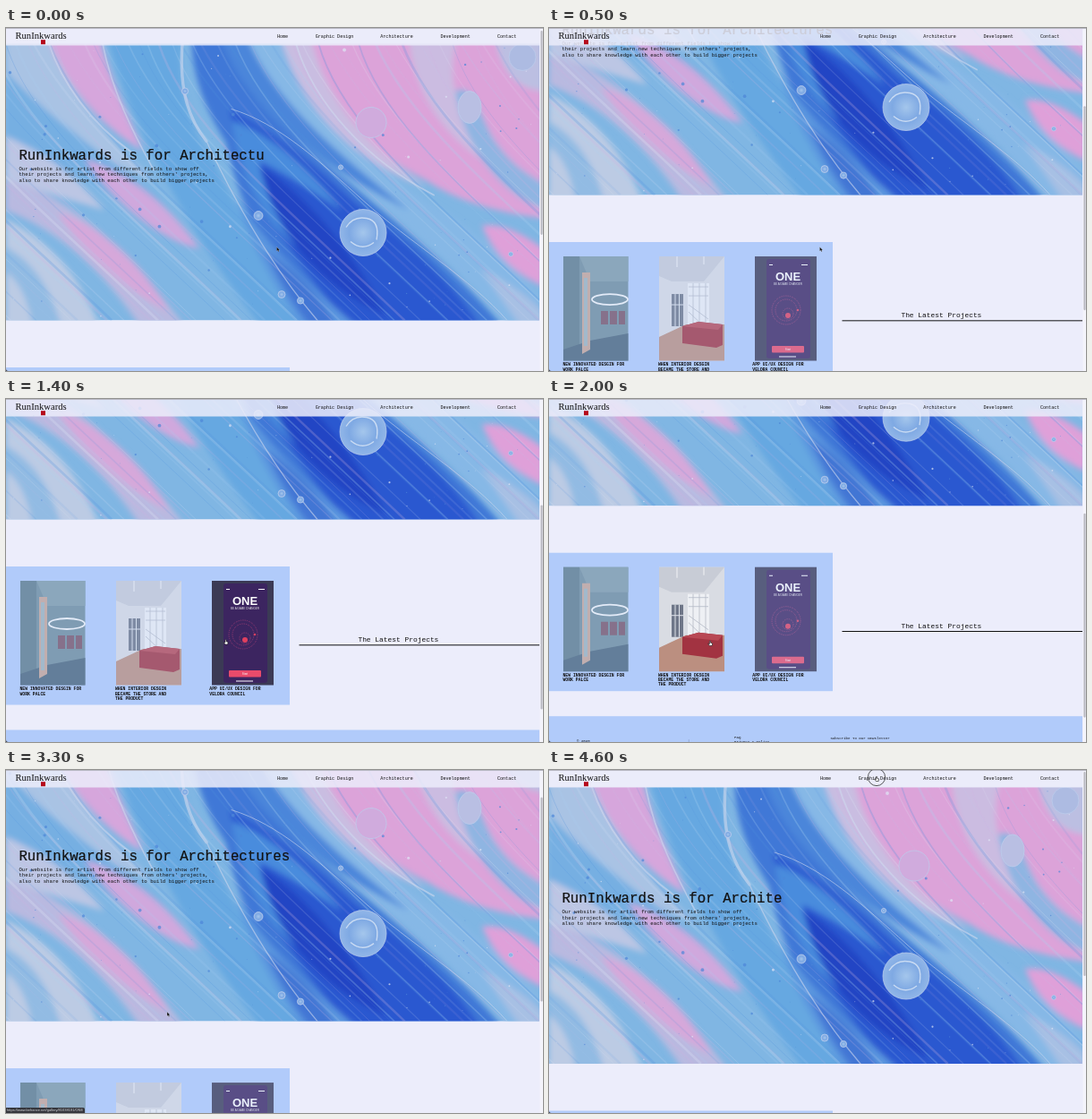
Recreate the animation shown at these times as an HTML page. Size 600x383 px, loop 4700 ms.

```html
<!DOCTYPE html>
<html lang="en">
<head>
<meta charset="utf-8">
<title>Portfolio page</title>
<style>
  html, body { margin: 0; width: 100%; height: 100%; overflow: hidden; background: #ecedfb; }
  svg { display: block; width: 100vw; height: 100vh; }
  text { font-family: "Liberation Mono", "Courier New", monospace; fill: #111; white-space: pre; }
  .sans { font-family: "Liberation Sans", Arial, sans-serif; }
  .serif { font-family: "Liberation Serif", "Times New Roman", serif; }
  .caption text { font-size: 4.77px; font-weight: bold; }
  .footer text { font-size: 4.1px; }
  .nav text { font-size: 5.07px; }
</style>
</head>
<body>
<svg viewBox="0 0 600 383" preserveAspectRatio="none">
  <defs>
    <clipPath id="heroClip"><rect y="19" width="596" height="309"/></clipPath>
    <filter id="soft" x="-10%" y="-10%" width="120%" height="120%"><feGaussianBlur stdDeviation="3"/></filter>
    <filter id="slight" x="-10%" y="-10%" width="120%" height="120%"><feGaussianBlur stdDeviation=".7"/></filter>
    <radialGradient id="bubble">
      <stop offset="0" stop-color="#a4c6ec"/><stop offset=".6" stop-color="#7fa9e3"/><stop offset="1" stop-color="#91b6e8"/>
    </radialGradient>
  </defs>
  <rect width="600" height="383" fill="#ecedfb"/>

  <g id="page">
    <g clip-path="url(#heroClip)">
      <rect y="19" width="596" height="309" fill="#80b6e3"/>
      <g filter="url(#soft)">
        <!-- left side bands -->
        <path fill="#a9c3e4" d="M0 10H48C70 70 110 125 165 170C120 160 55 115 0 55Z"/>
        <path fill="#76afe2" d="M0 50C50 105 120 150 170 190L205 250C130 190 50 150 0 125Z"/>
        <path fill="#d6a6dc" d="M46 10H104C116 60 135 95 152 138C108 112 68 70 46 10Z"/>
        <path fill="#66a8e1" d="M112 10H196C192 70 205 115 232 150C260 210 300 270 350 335H285C220 250 145 130 112 10Z"/>
        <path fill="#bcc6e4" d="M0 122C40 140 75 162 110 205C60 190 25 178 0 175Z"/>
        <path fill="#d0a8dd" d="M88 148C130 162 178 192 216 248C180 240 130 208 88 148Z"/>
        <path fill="#b9b9e0" d="M0 172C60 182 130 240 200 335H150C100 260 50 225 0 205Z"/>
        <path fill="#d6a8da" d="M58 208C100 218 152 262 182 318C130 292 88 255 58 208Z"/>
        <path fill="#bccbe4" d="M0 215C40 235 80 270 104 335H0Z"/>
        <path fill="#92bbe3" d="M0 246C25 260 48 285 62 335H30C24 300 12 282 0 274Z"/>
        <!-- central band -->
        <path fill="#3f78d7" d="M207 10H244C262 62 300 108 350 148C430 212 500 270 555 335H345C290 260 258 190 246 130C225 95 208 60 207 10Z"/>
        <path fill="#2b58d0" d="M250 92C300 118 340 150 390 196C450 240 500 285 530 335H384C330 270 268 190 250 92Z"/>
        <path fill="#4a8cdd" d="M253 105C300 122 345 165 375 205C345 185 305 160 283 150C288 185 310 220 330 250C290 220 260 165 253 105Z"/>
        <path fill="#2145c4" d="M284 156C325 180 378 235 425 322C360 295 302 240 284 156Z"/>
        <path fill="#5b97df" d="M256 185C285 240 340 290 392 335H330C300 290 272 245 256 185Z"/>
        <path fill="#4276d4" d="M290 250C320 270 350 300 370 335H340C320 310 302 280 290 250Z"/>
        <!-- right side -->
        <path fill="#86b8e6" d="M256 10H318C342 85 410 160 480 200C530 232 570 270 596 302V335H562C510 270 420 200 350 145C295 105 265 65 256 10Z"/>
        <path fill="#4b86da" d="M240 10H268C300 85 370 140 450 205C380 170 270 105 240 10Z"/>
        <path fill="#dca3d9" d="M338 10H600V214C555 208 510 198 470 172C405 140 358 90 338 10Z"/>
        <path fill="#c9bde1" d="M306 10H340C356 80 400 130 470 180C390 150 330 95 306 10Z"/>
        <path fill="#cbbce1" d="M450 10H505C486 70 515 115 552 160C510 140 455 90 450 10Z"/>
        <path fill="#8fb5e2" d="M502 72C525 60 530 105 548 130C568 158 585 165 600 175V204C550 185 510 130 502 72Z"/>
        <path fill="#bcbfe2" d="M546 10H600V72C570 70 552 48 546 10Z"/>
        <path fill="#dfa0d9" d="M532 222C560 220 582 235 600 248V290C570 276 545 255 532 222Z"/>
        <path fill="#a7c0e4" d="M530 270C560 285 582 300 600 318V335H575Z"/>
      </g>
      <g id="flow" fill="none" filter="url(#slight)"></g>
      <g fill="none" stroke="#cfd8ee" stroke-linecap="round" opacity=".6" filter="url(#slight)">
        <path stroke-width="3.4" d="M197 19C193 75 206 105 224 128"/>
        <path stroke-width="1.3" d="M224 128C258 200 300 272 348 328"/>
        <path stroke-width="1.6" d="M108 19C118 70 140 115 165 160"/>
        <path stroke-width="2" d="M48 19C62 62 95 108 140 140"/>
        <path stroke-width="1.8" d="M324 19C345 88 405 150 478 188"/>
        <path stroke-width="1" d="M252 92C305 108 350 150 400 195S520 282 560 328"/>
      </g>
      <g id="specks"></g>
      <g fill="url(#bubble)" stroke="#bccdec" stroke-width=".9" stroke-opacity=".8">
        <circle cx="399" cy="230" r="26"/>
        <ellipse cx="518" cy="90" rx="13" ry="18" fill="#b9bfe3"/>
        <circle cx="408" cy="107" r="17" fill="#d0abdd"/>
        <circle cx="577" cy="34" r="15" fill="#adbbe2"/>
        <circle cx="282" cy="211" r="5"/><circle cx="308" cy="299" r="4"/>
        <circle cx="329" cy="306" r="3.6"/><circle cx="374" cy="157" r="2.6"/>
        <circle cx="200" cy="72" r="3.6"/><circle cx="564" cy="254" r="2.4"/>
      </g>
      <path d="M380 224Q388 211 403 214T414 238M385 240Q398 251 411 241" fill="none" stroke="#c9dbf3" stroke-width="1.4"/>
    </g>

    <text id="title" x="14.4" y="148.3" font-size="15.78" stroke="#111" stroke-width=".2"></text>
    <g id="intro" font-size="5.7"></g>

    <rect y="380.5" width="317" height="154.5" fill="#b1cbfa"/>
    <g class="card" transform="translate(16 396.5)">
      <rect width="72.5" height="116.5" fill="#6f8d9c"/>
      <path fill="#5d7b8b" d="M0 0H18V116H0Z"/>
      <path fill="#7f9ba8" d="M18 0H72.5V28H30Z"/>
      <path fill="#4a657a" d="M0 104L30 94L72.5 86V116.5H0Z"/>
      <path fill="#c7a596" d="M21 18H30V104L21 109Z"/>
      <path fill="#9db4bc" d="M23 24H27V100H23Z"/>
      <path fill="#785466" d="M42 61H50V76H42ZM52 61H60V76H52ZM62 61H69V76H62Z"/>
      <ellipse cx="52" cy="48" rx="20" ry="6" fill="none" stroke="#f4f6f8" stroke-width="1.8"/>
    </g>
    <g class="card" id="roomCard" transform="translate(123 396.5)">
      <rect width="73" height="116.5" fill="#d9dce3"/>
      <path fill="#c8ccd6" d="M0 0H73L50 28H14L0 22Z"/>
      <path fill="#bb8f80" d="M0 90L30 76H73V116.5H0Z"/>
      <path fill="#6e7688" d="M14 42H27V78H14Z"/>
      <path stroke="#dfe3ea" d="M18 42V78M22.5 42V78M14 54H27" fill="none"/>
      <path fill="#eef0f4" d="M32 30H56V82H32Z"/>
      <path stroke="#b4b9c6" stroke-width=".8" fill="none" d="M33 34H55M33 44H55M33 54L55 70M33 62L52 80M38 30V76M45 30V78M52 30V80"/>
      <path fill="#a23341" d="M26 78L44 73L71 76V99L64 102L26 97Z"/>
      <path fill="#b84854" d="M26 78L44 73L71 76L66 82Z"/>
      <path stroke="#f2f3f6" d="M20 0V12M50 0V9"/>
    </g>
    <g class="card" id="appCard" transform="translate(230 396.5)">
      <rect width="69" height="116.5" fill="#3b3a55"/>
      <rect x="13" y="3" width="49" height="111" rx="3" fill="#3c2560"/>
      <path fill="#fff" d="M16 9H20V10H16ZM52 9H59V10H52ZM27 111.5H46V112.5H27Z"/>
      <text class="sans" x="37" y="27" font-size="13" font-weight="bold" text-anchor="middle" style="fill:#fff">ONE</text>
      <text class="sans" x="37" y="32.3" font-size="3" text-anchor="middle" style="fill:#eee">BE A GAME CHANGER</text>
      <g fill="none" stroke="#d04b80" stroke-width=".7" stroke-dasharray=".7 1.1">
        <circle cx="35" cy="60" r="16"/><circle cx="35" cy="60" r="12"/><circle cx="37" cy="64" r="6"/>
      </g>
      <circle cx="37" cy="66" r="3" fill="#e0405f"/>
      <circle cx="48" cy="60" r="1.2" fill="#e0405f"/>
      <rect x="19" y="100" width="36" height="7.5" rx="1" fill="#e94b6b"/>
      <text class="sans" x="37" y="105" font-size="3" text-anchor="middle" style="fill:#fff">Start</text>
    </g>
    <g class="caption" id="captions"></g>

    <text x="393.4" y="464.6" font-size="7.9">The Latest Projects</text>
    <path d="M327.5 468.3H596" stroke="#111"/>

    <g class="footer" transform="translate(0 563)">
      <rect width="596" height="73" fill="#b1cbfa"/>
      <g id="footerText"></g>
      <path d="M156.3 26V53" stroke="#8fa3cc" stroke-width=".8"/>
      <g fill="#8795b4">
        <rect x="211.5" y="39.5" width="6" height="6"/><rect x="221.5" y="39.5" width="6" height="6"/>
        <rect x="231.5" y="39.5" width="6" height="6"/><rect x="241" y="39.5" width="6" height="6"/>
      </g>
      <rect x="314.5" y="32.3" width="74.5" height="9.6" rx="4.8" fill="#a40a1f" stroke="#111"/>
      <path d="M366 32.8H319.3A4.3 4.3 0 0 0 319.3 41.4H366Z" fill="#fff"/>
      <path d="M366 32.3V41.9" stroke="#111"/>
      <text class="sans" x="317" y="38.6" style="font-size:4.7px;fill:#555">k@velmor.test</text>
      <text x="377" y="38.4" text-anchor="middle">Send</text>
    </g>
  </g>

  <g class="nav">
    <rect width="596" height="19.5" fill="#ecedfb" opacity=".86"/>
    <rect width="600" height="1" fill="#b9b9c4"/>
    <rect x="39" y="13.2" width="5" height="5" fill="#b5091b"/>
    <text class="serif" x="10.5" y="12" style="font-size:10.6px">RunInkwards</text>
    <g id="menu"></g>
  </g>

  <rect x="596.5" y="1" width="3.5" height="382" fill="#f4f4fb"/>
  <rect id="thumb" x="597.4" width="2.2" height="228" rx="1.1" fill="#b9b9c2"/>
  <path d="M0 380.5Q0 383 2.5 383H0Z" fill="#222"/>

  <g id="status">
    <path d="M0 377H86Q88 377 88 379V383H0Z" fill="#35363c"/>
    <text class="sans" x="1" y="381.4" font-size="4" style="fill:#d5d6da">https://www.behance.net/gallery/81038191/ONE</text>
  </g>

  <g id="pointer">
    <circle id="ring" cy="-1" r="9.6" fill="none" stroke="#333" stroke-width=".8"/>
    <path id="arrow" d="M0 0V4.6L1.1 3.7L1.9 5.3L2.7 4.9L2 3.4H3.3Z" fill="#111" stroke="#ddd" stroke-width=".25"/>
    <path id="hand" d="M-.6 -1.5Q0 -2.3 .6 -1.5V.3L2.6 .9L2.2 3.5H-.7L-2.2 1.2L-.6 1.5Z" fill="#fff" stroke="#111" stroke-width=".6"/>
  </g>
</svg>
<script>
  const LOOP = 4700, STEP = 100;
  const $ = id => document.getElementById(id);

  function add(parent, tag, attrs, content = "") {
    const el = document.createElementNS("http://www.w3.org/2000/svg", tag);
    for (const key in attrs) el.setAttribute(key, attrs[key]);
    el.textContent = content;
    $(parent).append(el);
  }
  const addLines = (parent, x, y, gap, lines) =>
    lines.forEach((line, i) => add(parent, "text", { x, y: y + i * gap }, line));

  addLines("intro", 14.4, 160.3, 6.45, [
    "Our website is for artist from different fields to show off",
    "their projects and learn new techniques from others' projects,",
    "also to share knowledge with each other to build bigger projects"]);
  addLines("captions", 15.5, 518.8, 5.2, ["NEW INNOVATED DESGIN FOR", "WORK PALCE"]);
  addLines("captions", 122, 518.8, 5.2, ["WHEN INTERIOR DESGIN", "BECAME THE STORE AND", "THE PRODUCT"]);
  addLines("captions", 227.3, 518.8, 5.2, ["APP UI/UX DESIGN FOR", "VELDRA COUNCIL"]);
  addLines("footerText", 31, 29.2, 5, ["© 2020", "All Rights Reserved"]);
  addLines("footerText", 207, 24.4, 5, ["FAQ", "Privacy & policy", "Terms & Conditions"]);
  addLines("footerText", 314.4, 26, 5, ["Subscribe To Our Newsletter"]);
  [["Home", 303], ["Graphic Design", 345.8], ["Architecture", 418.3], ["Development", 485.4], ["Contact", 549]]
    .forEach(([label, x]) => add("menu", "text", { x, y: 10.7 }, label));

  // Seeded paint streaks and droplets
  let seed = 11;
  const random = () => (seed = seed * 16807 % 2147483647) / 2147483647;
  const paints = ["#dfe5f3", "#4f90dd", "#a9d0f0", "#cdb3e0"];
  for (let i = 0; i < 70; i++) {
    const x = -320 + i * 12.5 + random() * 8, bend = random() * 30;
    add("flow", "path", {
      d: `M${x} 19C${x + 25 + bend} 110 ${x + 120 + bend} 185 ${x + 270 + bend} 328`,
      stroke: paints[i % 4], "stroke-width": .6 + random() * 2.2, opacity: .1 + random() * .18
    });
  }
  for (let i = 0; i < 130; i++) {
    add("specks", "circle", {
      cx: random() * 596, cy: 22 + random() * 304, r: .4 + random() ** 3 * 1.6,
      fill: i % 3 ? "#4d86d8" : "#dfe6f5", opacity: .7
    });
  }

  // Keys are [time, ...values]; each stretch eases in and out
  function track(keys, t) {
    const i = keys.findIndex(key => key[0] > t);
    if (i < 0) return keys.at(-1).slice(1);
    const [a, b] = [keys[i - 1], keys[i]];
    const p = (t - a[0]) / (b[0] - a[0]), eased = p * p * (3 - 2 * p);
    return a.slice(1).map((v, n) => v + (b[n + 1] - v) * eased);
  }
  const scrollKeys = [[0, 1.5], [760, 193.5], [1800, 193.5], [2400, 252.5], [2700, 252.5], [3530, 0]];
  const pointerKeys = [[0, 302.5, 244.5], [900, 302.5, 244.5], [1300, 245.5, 270.5], [1500, 245.5, 270.5],
    [1800, 180, 272], [3600, 180, 270], [4200, 366, 9]];

  const word = "Architectures";
  const lettersAt = t => t < 3650
    ? Math.min(word.length, 10 + Math.floor(t / 150))
    : word.length - Math.ceil((t - 3650) / 160);
  const show = (id, on) => $(id).setAttribute("visibility", on ? "visible" : "hidden");
  const setHover = (id, on) => $(id).setAttribute("opacity", on ? 1 : .75);
  document.querySelectorAll(".card").forEach(card => card.setAttribute("opacity", .75));

  function draw(t) {
    const [scroll] = track(scrollKeys, t);
    const [x, y] = track(pointerKeys, t);
    const overCard = (left, right) => x > left && x < right && y + scroll > 396.5 && y + scroll < 513;
    const overLink = (t >= 2300 && t < 2800) || t >= 4200;
    const overApp = overCard(230, 299), overRoom = overCard(123, 196);
    const hand = overApp || overRoom || overLink;
    $("page").setAttribute("transform", `translate(0 ${-scroll})`);
    $("thumb").setAttribute("y", 2 + scroll * .602);
    $("title").textContent = "RunInkwards is for " + word.slice(0, lettersAt(t));
    $("pointer").setAttribute("transform", `translate(${x} ${y})`);
    setHover("appCard", overApp && t > 1000);
    setHover("roomCard", overRoom && t < 2700);
    show("hand", hand);
    show("arrow", !hand);
    show("ring", t >= 4300);
    show("status", t >= 2300 && t < 3700);
  }

  const start = performance.now();
  function tick() {
    const t = (performance.now() - start) % LOOP;
    draw(Math.floor(t / STEP) * STEP);
    requestAnimationFrame(tick);
  }
  tick();
</script>
</body>
</html>
```
